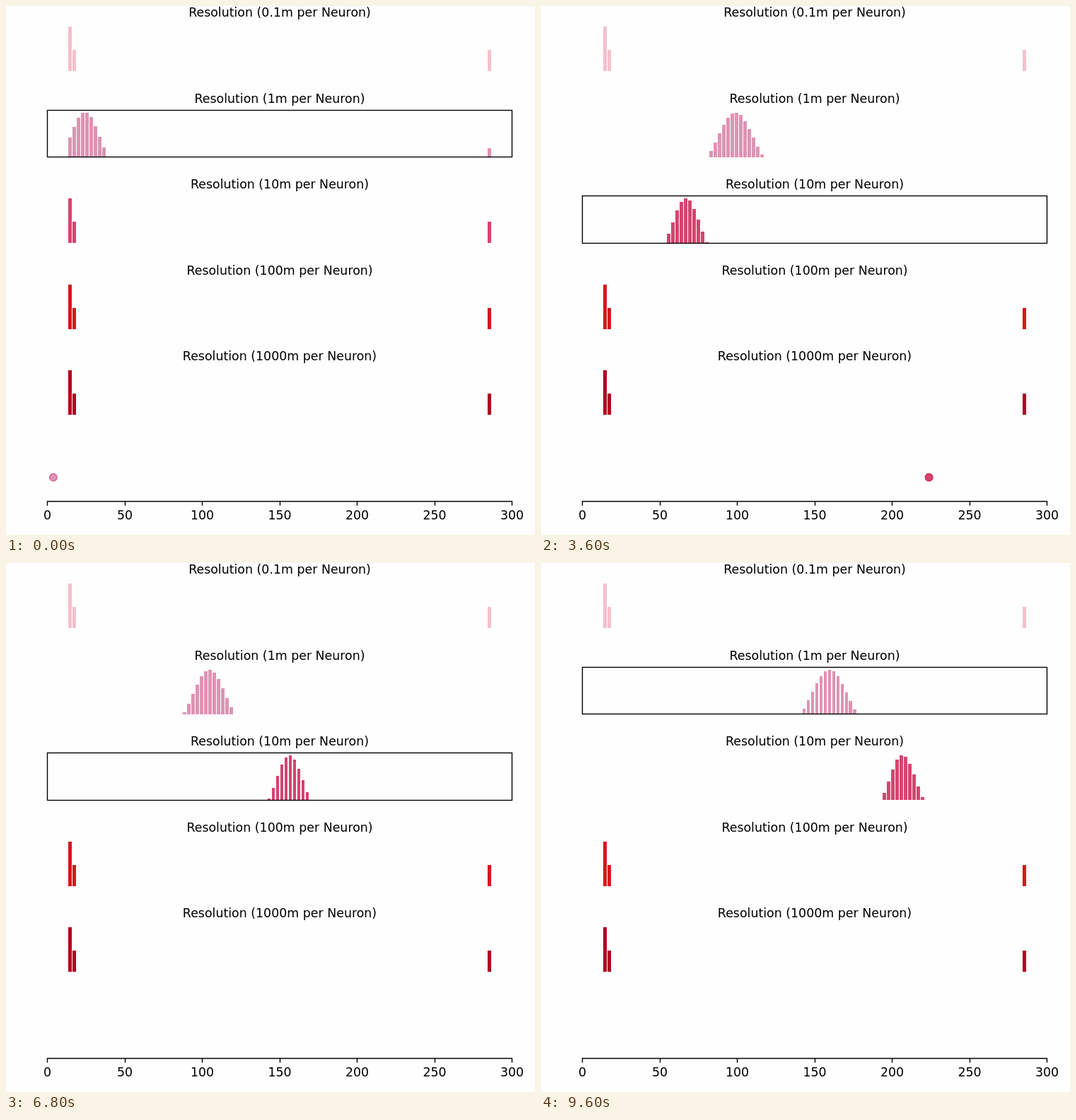
An HTML page with a canvas that plays this animation: 748x748 px, repeating every 9.7 s.

```html
<!DOCTYPE html>
<html lang="en">
<head>
<meta charset="utf-8">
<style>
html, body { margin: 0; width: 100%; height: 100%; overflow: hidden; background: #fefefe; }
canvas { display: block; }
</style>
</head>
<body>
<canvas id="stage" width="748" height="748"></canvas>
<script>
const ctx = document.getElementById('stage').getContext('2d');
const LOOP = 9700, STEP = 100, CELLS = 100;
const LEFT = 58.5, RIGHT = 715.5, UNIT = (RIGHT - LEFT) / 300;
const PITCH = 5.985, FIRST = 90.76, BAR = 4.79, PEAK = 63.3, BOX = 66.5;
const scales = ['0.1', '1', '10', '100', '1000'];
const colors = ['#f5c0cd', '#df93b4', '#d6446f', '#d3191d', '#b00222'];
const dotFill = { 1: '#df93b4', 2: '#d6446f' };
const dotEdge = { 1: '#d2739d', 2: '#cf2d5c' };
const WIDE = 3.1;

// Steps in which the fine (1m) module is driven; the 10m module moves in all others.
const fineSteps = new Set([0, 1, 2, 14, 15, 21, 22, 28, 33, 53, 80, 81, 87, 94, 95, 96]);

// step, fine centre, fine width, coarse centre, dot position
const keys = [
  [0, 3.55, 3.45, 0, 3.85],
  [10, 9.7, 4.96, 5.25, 63],
  [25, 24.8, 4.42, 12.25, 150],
  [36, 30.75, 4.13, 19.1, 223.8],
  [55, 32.8, 3.77, 34.9, 384],
  [60, 32.8, 3.77, 40.7, 442],
  [70, 32.8, 3.77, 54.6, 581],
  [80, 34.86, 3.7, 62.5, 662],
  [96, 52.95, 4.2, 70.27, 758]
];

const mix = (a, b, k) => a + (b - a) * k;

function countFine(from, to) {
  let n = 0;
  for (let s = from + 1; s <= to; s++) if (fineSteps.has(s)) n++;
  return n;
}

function poseAt(step) {
  const i = Math.max(1, keys.findIndex(k => k[0] >= step));
  const [s0, fine0, width0, coarse0, dot0] = keys[i - 1];
  const [s1, fine1, width1, coarse1, dot1] = keys[i];
  const allFine = countFine(s0, s1), nowFine = countFine(s0, step);
  const fineK = allFine ? nowFine / allFine : 0;
  const coarseK = (step - s0 - nowFine) / (s1 - s0 - allFine);
  const fineRun = fine1 - fine0, coarseRun = 10 * (coarse1 - coarse0);
  const travel = (fineRun * fineK + coarseRun * coarseK) / (fineRun + coarseRun);
  return {
    active: fineSteps.has(step) ? 1 : 2,
    fine: mix(fine0, fine1, fineK),
    width: mix(width0, width1, fineK),
    coarse: mix(coarse0, coarse1, coarseK),
    dot: mix(dot0, dot1, travel)
  };
}

const resting = i => i === 0 ? 1 : i === 1 || i === CELLS - 1 ? 0.47 : 0;

// Thresholded Gaussian on a ring of cells.
function bump(center, width) {
  const floor = 0.271;
  return i => {
    const gap = Math.abs(i - center), d = Math.min(gap, CELLS - gap);
    return Math.max(0, Math.exp(-d * d / (2 * width * width)) - floor) / (1 - floor);
  };
}

function drawModule(row, shape, active) {
  const base = 92.2 + 121.5 * row, bottom = Math.round(base);
  const levels = Array.from({ length: CELLS }, (_, i) => shape(i));
  const top = Math.max(...levels);
  ctx.fillStyle = colors[row];
  levels.forEach((level, i) => {
    const h = Math.round(PEAK * level / top);
    const x = FIRST + PITCH * i - BAR / 2;
    const l = Math.round(x), r = Math.round(x + BAR);
    if (h) ctx.fillRect(l, bottom - h, r - l, h);
  });
  ctx.fillStyle = '#000';
  ctx.fillText(`Resolution (${scales[row]}m per Neuron)`, 387, base - 77);
  if (active) {
    const y0 = Math.floor(base - BOX) + 0.5, y1 = Math.floor(base) + 0.5;
    ctx.strokeRect(LEFT, y0, RIGHT - LEFT, y1 - y0);
  }
}

function drawAxis() {
  ctx.beginPath();
  ctx.moveTo(LEFT - 0.7, 700.5);
  ctx.lineTo(RIGHT + 0.7, 700.5);
  for (let v = 0; v <= 300; v += 50) {
    const x = LEFT + v * UNIT;
    ctx.moveTo(Math.floor(x) + 0.5, 700.5);
    ctx.lineTo(Math.floor(x) + 0.5, 706.5);
    ctx.fillText(v, x, 725.7);
  }
  ctx.stroke();
}

function drawDot(pos, active) {
  if (pos > 300) return;
  ctx.beginPath();
  ctx.arc(LEFT + pos * UNIT, 666.5, 5.2, 0, 2 * Math.PI);
  ctx.fillStyle = dotFill[active];
  ctx.fill();
  ctx.save();
  ctx.strokeStyle = dotEdge[active];
  ctx.lineWidth = 1.7;
  ctx.stroke();
  ctx.restore();
}

function frame() {
  const pose = poseAt(Math.floor(performance.now() % LOOP / STEP));
  ctx.fillStyle = '#fefefe';
  ctx.fillRect(0, 0, 748, 748);
  ctx.font = '17.4px "DejaVu Sans", sans-serif';
  ctx.textAlign = 'center';
  ctx.strokeStyle = '#000';
  ctx.lineWidth = 1.39;
  scales.forEach((_, row) => {
    let shape = resting;
    if (row === 1) shape = bump(pose.fine, pose.width);
    if (row === 2 && pose.coarse > 0) shape = bump(pose.coarse, WIDE);
    drawModule(row, shape, row === pose.active);
  });
  drawAxis();
  drawDot(pose.dot, pose.active);
  requestAnimationFrame(frame);
}
frame();
</script>
</body>
</html>
```
